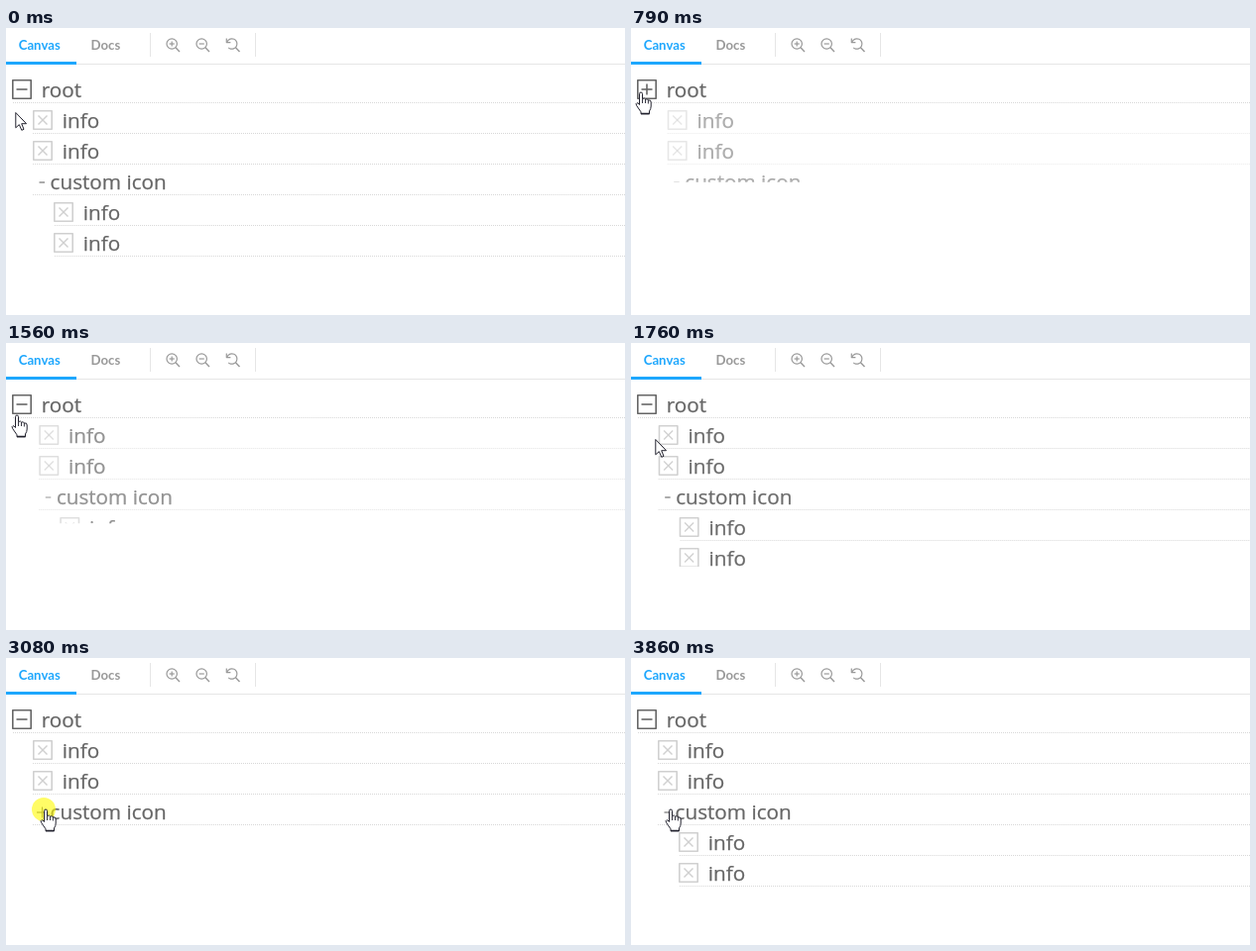
An HTML page with a canvas for the animation above (4.39 s loop, 624x290 px).

```html
<!DOCTYPE html>
<html lang="en">
<head>
<meta charset="utf-8">
<title>Tree view</title>
<style>
  html, body { margin: 0; width: 100%; height: 100%; overflow: hidden; background: #fff; }
  canvas { display: block; }
</style>
</head>
<body>
<canvas id="stage" width="624" height="290"></canvas>
<script>
const ctx = document.getElementById('stage').getContext('2d');
const W = 624, H = 290, LOOP = 4390, ROW = 31;
const INK = '#666', PALE = '#d0d0d0', GREY = '#999', BLUE = '#1ea7fd', OUTLINE = '#22222e';

// The picture only refreshes at these moments (ms).
const TICKS = [0, 100, 220, 330, 550, 670, 790, 890, 1010, 1330, 1430, 1540, 1650, 1760, 1880,
  1990, 2100, 2210, 2320, 2420, 2530, 2640, 2750, 3080, 3180, 3300, 3410, 3520, 3640, 3860];
const CLICKS = [550, 1330, 2420, 3080];

// time, hotspot x, hotspot y, shape
const POINTER = [
  [0, 9, 85, arrow], [100, 9, 78, arrow], [220, 8, 68, hand], [330, 8, 65, hand],
  [1540, 9, 73, hand], [1650, 15, 84, arrow], [1760, 24, 97, arrow], [1880, 31, 118, arrow],
  [1990, 36, 138, arrow], [2100, 38, 149, hand], [2210, 38, 153, hand]
];

// Critically damped spring, 0 to 1.
function spring(t, start) {
  const k = 13.04 * Math.max(0, t - start) / 1000;
  return 1 - (1 + k) * Math.exp(-k);
}

function openness(t, closeAt, openAt) {
  const v = t < openAt ? 1 - spring(t, closeAt) : spring(t, openAt);
  return v > 0.99 ? 1 : v < 0.01 ? 0 : v;
}

function line(color, width, ...points) {
  ctx.strokeStyle = color;
  ctx.lineWidth = width;
  ctx.beginPath();
  for (let i = 0; i < points.length; i += 2) ctx.lineTo(points[i], points[i + 1]);
  ctx.stroke();
}

function arc(x, y, r, from = 0, to = Math.PI * 2) {
  ctx.beginPath();
  ctx.arc(x, y, r, from, to);
}

function text(str, x, y, font, color) {
  ctx.font = font;
  ctx.fillStyle = color;
  ctx.fillText(str, x, y);
}

function lens(x, from, to) {
  ctx.strokeStyle = GREY;
  ctx.lineWidth = 1.2;
  arc(x - 0.8, 16, 5.2, from, to);
  ctx.stroke();
  line(GREY, 1.4, x + 3, 19.8, x + 7, 24);
}

function magnifier(x, plus) {
  lens(x);
  line(GREY, 1.2, x - 3.4, 16, x + 1.8, 16);
  if (plus) line(GREY, 1.2, x - 0.8, 13.4, x - 0.8, 18.6);
}

function toolbar() {
  ctx.fillStyle = '#e6e6e6';
  ctx.fillRect(0, 36, W, 1);
  ctx.fillRect(145, 5, 1, 24);
  ctx.fillRect(251, 5, 1, 24);
  ctx.fillStyle = BLUE;
  ctx.fillRect(0, 34, 71, 3);
  const font = 'bold 13.2px Lato, sans-serif';
  text('Canvas', 12.7, 22, font, BLUE);
  text('Docs', 85.5, 22, font, GREY);
  magnifier(168, true);
  magnifier(198, false);
  lens(228.5, -2.7, 2.3);
  line(GREY, 1.2, 222.3, 10.5, 222.3, 14.6, 226.4, 14.6);
}

function row(label, x, labelX, y) {
  const font = '20.7px "Open Sans", sans-serif';
  text(label, labelX, y + 8, font, INK);
  // A hairline outline gives the label its slightly heavier weight.
  ctx.strokeStyle = INK;
  ctx.lineWidth = 0.25;
  ctx.strokeText(label, labelX, y + 8);
  ctx.setLineDash([1, 1]);
  line('#d8d8d8', 1, x | 1, y + 13.5, W + 30, y + 13.5);
  ctx.setLineDash([]);
}

function box(x, y, color) {
  ctx.strokeStyle = color;
  ctx.lineWidth = 1.6;
  ctx.lineJoin = 'round';
  ctx.strokeRect(x + 0.8, y - 9.2, 18.4, 18.4);
}

function toggleRow(y, open) {
  box(6, y, INK);
  line(INK, 1.6, 10.5, y, 21.5, y);
  if (!open) line(INK, 1.6, 16, y - 5.5, 16, y + 5.5);
  row('root', 6, 35.8, y);
}

function leaf(x, y) {
  const c = x + 10;
  box(x, y, PALE);
  line(PALE, 1.4, c - 4.5, y - 4.5, c + 4.5, y + 4.5);
  line(PALE, 1.4, c - 4.5, y + 4.5, c + 4.5, y - 4.5);
  row('info', x, x + 29.8, y);
}

function customRow(y, open) {
  if (open) line(INK, 1.1, 33.5, y + 1, 39, y + 1);
  else {
    line(INK, 1.1, 31, y + 1, 42, y + 1);
    line(INK, 1.1, 36.5, y - 4.5, 36.5, y + 6.5);
  }
  row('custom icon', 27, 44.6, y);
}

// Children slide, fade and unfold together.
function branch(top, rows, open, draw) {
  if (!open) return;
  ctx.save();
  ctx.beginPath();
  ctx.rect(0, top, W, rows * ROW * open);
  ctx.clip();
  ctx.translate(20 * (1 - open), 0);
  ctx.globalAlpha *= open;
  draw();
  ctx.restore();
}

function tree(t) {
  const rootOpen = t < 670 || t >= 1430;
  const customOpen = t < 2530 || t >= 3180;
  toggleRow(62, rootOpen);
  branch(76, 5, openness(t, 665, 1358), () => {
    leaf(27, 93);
    leaf(27, 124);
    customRow(155, customOpen);
    branch(169, 2, openness(t, 2470, 3140), () => {
      leaf(48, 186);
      leaf(48, 217);
    });
  });
}

function outlined(path) {
  const shape = new Path2D(path);
  ctx.fillStyle = '#fff';
  ctx.strokeStyle = OUTLINE;
  ctx.lineWidth = 1;
  ctx.lineJoin = 'round';
  ctx.fill(shape);
  ctx.stroke(shape);
}

function arrow() {
  outlined('M.8 .5V15.8L4.3 12.6L6.8 18.3L9 17.3L6.7 11.7H11.5Z');
}

function hand() {
  ctx.translate(-4, -0.5);
  outlined('M4.5 13V2Q4.5 .5 6 .5T7.5 2V7Q9.8 5.8 10.5 7.6Q12.7 6.5 13.4 8.5Q16.2 7.7 16.2 10.5V14.5' +
    'Q16.2 17 14.5 19.5V22.3H6V20.3L1.8 14.2Q.2 11.6 2 11.2Q3 11.2 4.5 13Z');
  line(OUTLINE, 0.9, 7.5, 7, 7.5, 11.5);
  line(OUTLINE, 0.9, 10.5, 7.6, 10.5, 11.5);
  line(OUTLINE, 0.9, 13.4, 8.5, 13.4, 12);
  line(OUTLINE, 1.5, 6, 22, 14.5, 22);
}

function pointer(t) {
  const [, x, y, shape] = POINTER.findLast(p => p[0] <= t);
  if (CLICKS.includes(t)) {
    ctx.fillStyle = 'rgba(255, 250, 0, .6)';
    arc(x, y, 12);
    ctx.fill();
  }
  ctx.save();
  ctx.translate(x, y);
  shape();
  ctx.restore();
}

function render() {
  const now = performance.now() % LOOP;
  const t = TICKS.findLast(tick => tick <= now);
  ctx.fillStyle = '#fff';
  ctx.fillRect(0, 0, W, H);
  toolbar();
  tree(t);
  pointer(t);
  requestAnimationFrame(render);
}
render();
</script>
</body>
</html>
```
